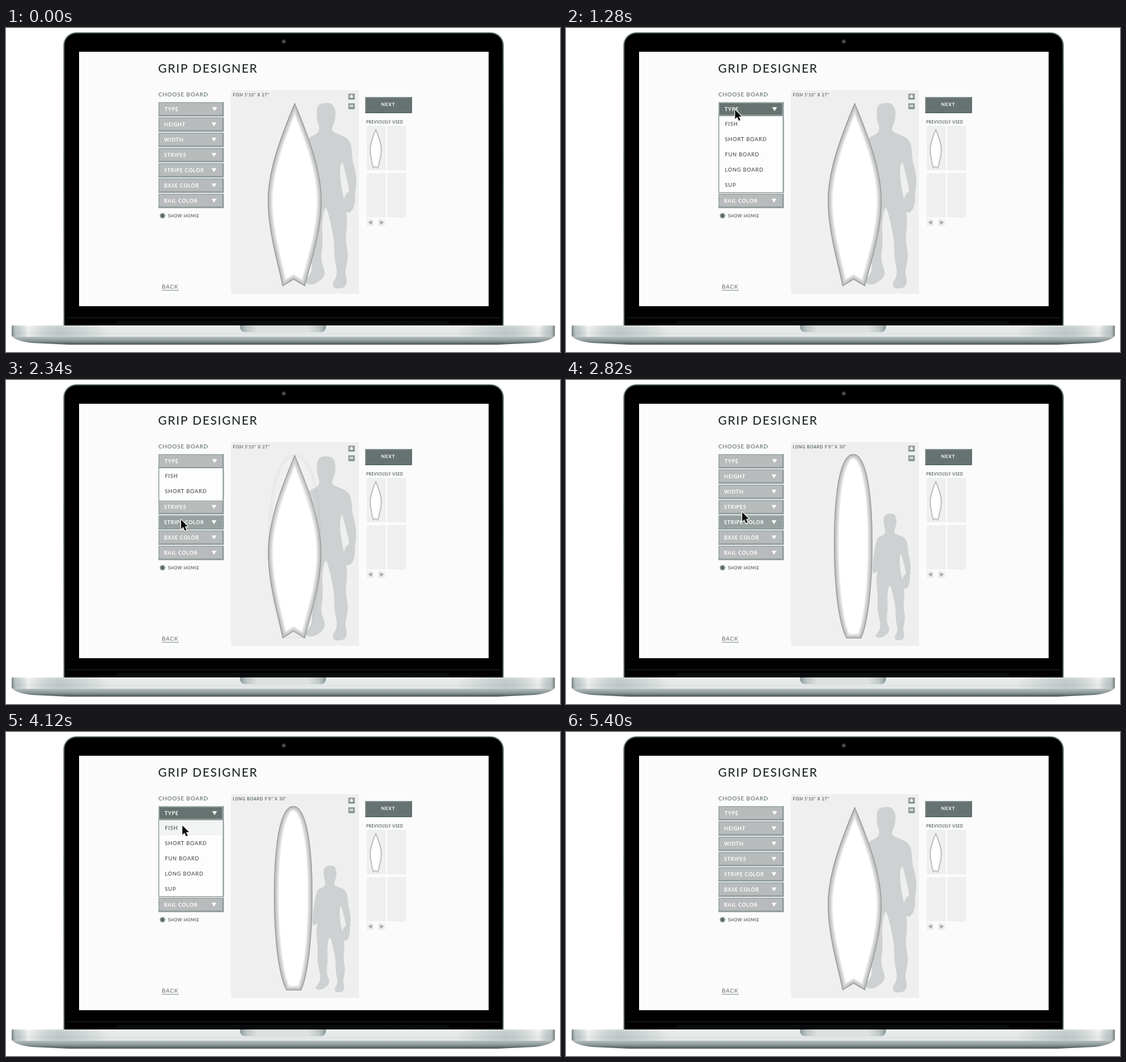
An HTML page with a canvas for the animation above (5420 ms loop, 978 by 573 pixels).

```html
<!DOCTYPE html>
<html lang="en">
<head>
<meta charset="utf-8">
<title>Grip designer</title>
<style>
html, body { margin: 0; width: 100%; height: 100%; overflow: hidden; background: #fff; }
canvas { display: block; }
</style>
</head>
<body>
<canvas id="stage" width="978" height="573"></canvas>
<script>
const ctx = document.getElementById('stage').getContext('2d');
const LOOP = 5420;
const BUTTONS = ['TYPE', 'HEIGHT', 'WIDTH', 'STRIPES', 'STRIPE COLOR', 'BASE COLOR', 'RAIL COLOR'];
const ITEMS = ['FISH', 'SHORT BOARD', 'FUN BOARD', 'LONG BOARD', 'SUP'];
const ROW = 27, TOP = 131;

// Cursor tip: time, x, y
const PATH = [
  [0, 298, 140], [1260, 298, 141], [1680, 306, 213], [1960, 308, 240], [2140, 309, 247],
  [2700, 309, 247], [2820, 311, 234], [3360, 313, 149], [3900, 313, 149],
  [4160, 311, 168], [4300, 311, 168], [4520, 310, 167], [5420, 310, 167]
];

// Outline of the standing figure at full size
const FIGURE = [
  565,132, 577,134, 582,146, 581,164, 575,177, 577,184, 591,189, 606,197, 611,214, 611,233,
  617,252, 619,275, 616,292, 617,308, 611,324, 602,328, 596,319, 595,306, 601,291, 607,289,
  602,268, 597,248, 593,233, 589,252, 592,283, 599,312, 603,342, 599,374, 605,402, 598,432,
  603,450, 597,460, 579,461, 576,451, 586,436, 579,404, 580,380, 573,344, 564,310, 557,346,
  560,378, 555,410, 564,432, 560,442, 545,454, 529,453, 528,446, 543,428, 532,384, 534,352,
  529,300, 534,278, 518,292, 521,254, 526,220, 532,194, 550,187, 554,178, 549,164, 548,144, 553,134
];

const BOARDS = {
  fish: {
    label: 'FISH 5\'10" X 27"', cx: 509.7, w: 95, labelW: 62, headX: 565, size: 1,
    draw(p) {
      p.moveTo(0, 132);
      p.bezierCurveTo(22, 185, 47.5, 248, 47.5, 305);
      p.bezierCurveTo(47.5, 360, 30, 410, 18, 457);
      p.lineTo(-2, 445);
      p.lineTo(-21.5, 457);
      p.bezierCurveTo(-31, 410, -47.5, 360, -47.5, 305);
      p.bezierCurveTo(-47.5, 248, -22, 185, 0, 132);
    }
  },
  long: {
    label: 'LONG BOARD 9\'0" X 30"', cx: 507, w: 68, labelW: 95, headX: 572, size: 224 / 328,
    draw(p) {
      p.moveTo(0, 131);
      p.bezierCurveTo(24, 131, 34, 200, 34, 290);
      p.bezierCurveTo(34, 360, 27, 430, 14, 457);
      p.lineTo(-12, 457);
      p.bezierCurveTo(-27, 430, -34, 360, -34, 290);
      p.bezierCurveTo(-34, 200, -24, 131, 0, 131);
    }
  }
};

const clamp = v => Math.max(0, Math.min(1, v));
const lerp = (a, b, k) => a + (b - a) * k;
const ramp = (t, a, b) => clamp((t - a) / (b - a));
const ease = k => k * k * (3 - 2 * k);

function rect(x, y, w, h, fill) {
  ctx.fillStyle = fill;
  ctx.fillRect(x, y, w, h);
}

function rounded(x, y, w, h, r, fill) {
  ctx.beginPath();
  ctx.roundRect(x, y, w, h, r);
  ctx.fillStyle = fill;
  ctx.fill();
}

function shape(points, fill) {
  ctx.beginPath();
  for (let i = 0; i < points.length; i += 2) ctx.lineTo(points[i], points[i + 1]);
  ctx.closePath();
  ctx.fillStyle = fill;
  ctx.fill();
}

function gradient(x0, y0, x1, y1, stops) {
  const g = ctx.createLinearGradient(x0, y0, x1, y1);
  stops.forEach(([at, color]) => g.addColorStop(at, color));
  return g;
}

function text(str, x, y, size, spacing, color, weight = 700) {
  ctx.font = `${weight} ${size}px Lato, "Open Sans", sans-serif`;
  ctx.letterSpacing = spacing + 'px';
  ctx.fillStyle = color;
  ctx.fillText(str, x, y);
}

function faded(alpha, draw) {
  if (alpha <= 0) return;
  ctx.save();
  ctx.globalAlpha *= alpha;
  draw();
  ctx.restore();
}

function laptop() {
  rect(0, 0, 978, 573, '#fff');
  rounded(101, 7, 778, 522, [23, 23, 3, 3], gradient(0, 7, 0, 527,
    [[0, '#b4bec1'], [0.05, '#8d9a9e'], [0.5, '#7e8d92'], [1, '#a6b1b4']]));
  rounded(102.5, 8.5, 775, 520, [22, 22, 3, 3], '#26302f');
  rounded(104, 10, 772, 518, [20, 20, 3, 3], '#000');
  rect(107, 512, 766, 1, '#20292a');
  rect(195, 518, 587, 5, '#0a0e0e');

  ctx.beginPath();
  ctx.arc(490.5, 24, 4, 0, 7);
  ctx.fillStyle = '#262a2a';
  ctx.fill();
  ctx.beginPath();
  ctx.arc(490.5, 24, 1.7, 0, 7);
  ctx.fillStyle = '#697273';
  ctx.fill();

  ctx.beginPath();
  ctx.moveTo(10, 544);
  ctx.quadraticCurveTo(14, 553, 46, 557);
  ctx.lineTo(110, 560);
  ctx.lineTo(868, 560);
  ctx.lineTo(933, 557);
  ctx.quadraticCurveTo(965, 553, 969, 544);
  ctx.closePath();
  ctx.fillStyle = gradient(0, 545, 0, 560, [[0, '#b9c2c2'], [0.55, '#8d9999'], [1, '#465354']]);
  ctx.fill();

  rounded(10, 526, 959, 20, [2, 2, 3, 3], gradient(0, 526, 0, 546,
    [[0, '#eef1f0'], [0.2, '#dde2e2'], [0.8, '#cfd6d5'], [1, '#dfe4e3']]));
  rounded(10, 526, 959, 20, [2, 2, 3, 3], gradient(10, 0, 969, 0, [
    [0, 'rgba(80,95,97,.75)'], [0.007, 'rgba(120,133,134,.3)'], [0.03, 'rgba(255,255,255,.5)'],
    [0.09, 'rgba(130,142,142,.25)'], [0.18, 'rgba(255,255,255,.35)'], [0.82, 'rgba(255,255,255,.35)'],
    [0.91, 'rgba(130,142,142,.25)'], [0.97, 'rgba(255,255,255,.5)'],
    [0.993, 'rgba(120,133,134,.3)'], [1, 'rgba(80,95,97,.75)']]));
  rounded(413, 526, 152, 12, [0, 0, 9, 9], gradient(413, 0, 565, 0, [
    [0, '#8b9797'], [0.07, '#bcc5c5'], [0.2, '#dce1e0'], [0.8, '#dce1e0'], [0.93, '#bcc5c5'], [1, '#8b9797']]));

  rect(129, 42, 723, 450, '#fbfbfb');
}

function bevel(x, y, w, h, fill, light, dark) {
  rect(x, y, w, h, dark);
  rect(x, y, w - 2, h - 2, light);
  rect(x + 2, y + 2, w - 5, h - 5, fill);
}

function button(i, hover, active) {
  const y = TOP + i * ROW, shift = i ? 0 : 1;
  bevel(269, y, 115.5, 25.5, '#b8bbbb', '#a3acac', '#879494');
  faded(hover, () => rect(271, y + 2, 110.5, 20.5, '#97a1a0'));
  faded(active, () => rect(271, y + 2, 110.5, 20.5, '#667270'));
  text(BUTTONS[i], 279 + shift, y + 15.7, 9, 0.7, '#fff');
  const x = 363 + shift;
  shape([x, y + 9, x + 8.5, y + 9, x + 4.2, y + 16], '#fff');
}

function menu(open, cursorY) {
  if (open <= 0) return;
  const h = 136 * open;
  ctx.save();
  ctx.beginPath();
  ctx.rect(269, 156, 116, h);
  ctx.clip();
  rect(269, 156, 115.5, h, '#8d9a9a');
  rect(270.5, 156, 112, h - 1.5, '#fdfdfd');
  ITEMS.forEach((name, i) => {
    const mid = 169.5 + i * ROW;
    faded(clamp(1 - Math.abs(cursorY - 3 - mid) / ROW), () => rect(270.5, mid - 13.5, 112, 27, '#eff1f1'));
    text(name, 280.5, mid + 3.6, 9.3, 0.75, '#454d4d', 500);
  });
  ctx.restore();
}

function figure(headX, size) {
  const px = i => headX + size * (FIGURE[i] - 565);
  const py = i => 460 - size * (460 - FIGURE[i + 1]);
  const n = FIGURE.length;
  ctx.beginPath();
  for (let i = 0; i <= n; i += 2) {
    const a = i % n, b = (i + 2) % n;
    const mx = (px(a) + px(b)) / 2, my = (py(a) + py(b)) / 2;
    if (i) ctx.quadraticCurveTo(px(a), py(a), mx, my);
    else ctx.moveTo(mx, my);
  }
  ctx.fillStyle = '#cdd1d2';
  ctx.fill();
}

function board(kind, cx, width) {
  ctx.save();
  ctx.save();
  ctx.translate(cx, 0);
  ctx.scale(width / kind.w, 1);
  ctx.beginPath();
  kind.draw(ctx);
  ctx.closePath();
  ctx.restore();
  ctx.fillStyle = '#fff';
  ctx.fill();
  ctx.clip();
  ctx.strokeStyle = 'rgba(105,112,112,.075)';
  for (let w = 2; w <= 18; w += 2) {
    ctx.lineWidth = w;
    ctx.stroke();
  }
  ctx.lineWidth = 2.6;
  ctx.strokeStyle = 'rgba(120,128,128,.55)';
  ctx.stroke();
  ctx.restore();
}

function preview(from, to, k) {
  const mix = key => lerp(from[key], to[key], k);
  const show = clamp(k * 2.5);
  const label = kind => {
    ctx.save();
    ctx.translate(400.5, 0);
    ctx.scale(mix('labelW') / kind.labelW, 1);
    text(kind.label, 0, 120.7, 7, 0.75, '#5f6a6a');
    ctx.restore();
  };
  rect(397, 110, 226, 360, '#efefef');
  figure(mix('headX'), mix('size'));
  if (show < 1) {
    board(from, mix('cx'), mix('w'));
    faded(1 - show, () => label(from));
  }
  faded(show, () => {
    board(to, mix('cx'), mix('w'));
    label(to);
  });
  [116, 133].forEach((y, i) => {
    bevel(604.5, y, 11, 10.5, '#a9b2b2', '#97a2a2', '#7b8888');
    rect(607, y + 4.3, 6, 1.6, '#fff');
    if (!i) rect(609.2, y + 2, 1.6, 6, '#fff');
  });
}

function sidebar() {
  bevel(634, 122, 82.5, 28.5, '#667270', '#7f8b8a', '#3f5152');
  text('NEXT', 662.5, 137.6, 8.2, 0.8, '#fff');
  text('PREVIOUSLY USED', 636, 169, 6.6, 0.45, '#5f6a6a');
  for (const x of [637, 673]) for (const y of [173, 256.5]) rect(x, y, 33.5, 78.5, '#efefef');
  ctx.save();
  ctx.translate(652.7, 178.5);
  ctx.scale(0.215, 0.215);
  ctx.translate(0, -132);
  board(BOARDS.fish, 0, 95);
  ctx.beginPath();
  BOARDS.fish.draw(ctx);
  ctx.lineWidth = 4;
  ctx.strokeStyle = '#b3b8b8';
  ctx.stroke();
  ctx.restore();
  rect(637, 338, 12, 12, '#ededed');
  rect(657, 338, 12, 12, '#ededed');
  shape([646, 340.5, 646, 347.5, 639.5, 344], '#9ea4a4');
  shape([660.5, 340.5, 660.5, 347.5, 667, 344], '#9ea4a4');
}

function cursor(x, y) {
  ctx.save();
  ctx.translate(x, y);
  ctx.beginPath();
  [[0, 0], [0, 16.5], [3.8, 13], [6.7, 19.4], [9.5, 18.2], [6.7, 12], [11.8, 11.8]]
    .forEach(p => ctx.lineTo(...p));
  ctx.closePath();
  ctx.lineWidth = 2.4;
  ctx.lineJoin = 'round';
  ctx.strokeStyle = '#fff';
  ctx.stroke();
  ctx.fillStyle = '#0b0d0d';
  ctx.fill();
  ctx.restore();
}

function cursorAt(t) {
  const i = Math.max(1, PATH.findIndex(p => p[0] > t));
  const a = PATH[i - 1], b = PATH[i];
  const k = ramp(t, a[0], b[0]);
  return [lerp(a[1], b[1], k), lerp(a[2], b[2], k)];
}

function scene(t) {
  const [x, y] = cursorAt(t);
  const visible = ramp(t, 80, 460) * (1 - ramp(t, 5080, 5380));
  const active = t < 3000
    ? ramp(t, 980, 1060) * (1 - ramp(t, 2260, 2340))
    : ramp(t, 3660, 3760) * (1 - ramp(t, 4260, 4340));
  const open = t < 3000
    ? ease(ramp(t, 1060, 1240)) * (1 - ease(ramp(t, 2270, 2400)))
    : ease(ramp(t, 3810, 3980)) * (1 - ease(ramp(t, 4270, 4400)));
  const over = Math.floor((y + 6 - TOP) / ROW);

  laptop();
  text('GRIP DESIGNER', 268.5, 78.7, 21, 1.65, '#222b2b', 500);
  text('CHOOSE BOARD', 269, 121, 10, 0.75, '#5f6a6a', 500);
  BUTTONS.forEach((_, i) => button(i, i === over ? visible : 0, i ? 0 : active));
  menu(open, y);

  ctx.beginPath();
  ctx.arc(276.3, 332, 4.2, 0, 7);
  ctx.fillStyle = '#5f6e6d';
  ctx.fill();
  ctx.lineWidth = 1.6;
  ctx.strokeStyle = '#a1abab';
  ctx.stroke();
  text('SHOW HOMIE', 286, 334.6, 7.2, 0.63, '#5f6a6a');
  text('BACK', 275, 461, 10, 0.8, '#687473', 500);
  rect(275, 463.3, 30, 1.2, '#8a9c9c');

  if (t < 3000) preview(BOARDS.fish, BOARDS.long, ease(ramp(t, 2300, 2740)));
  else preview(BOARDS.long, BOARDS.fish, ease(ramp(t, 4300, 4740)));
  sidebar();
  faded(visible, () => cursor(x, y));
}

const start = performance.now();
function tick() {
  scene((performance.now() - start) % LOOP);
  requestAnimationFrame(tick);
}
tick();
</script>
</body>
</html>
```
